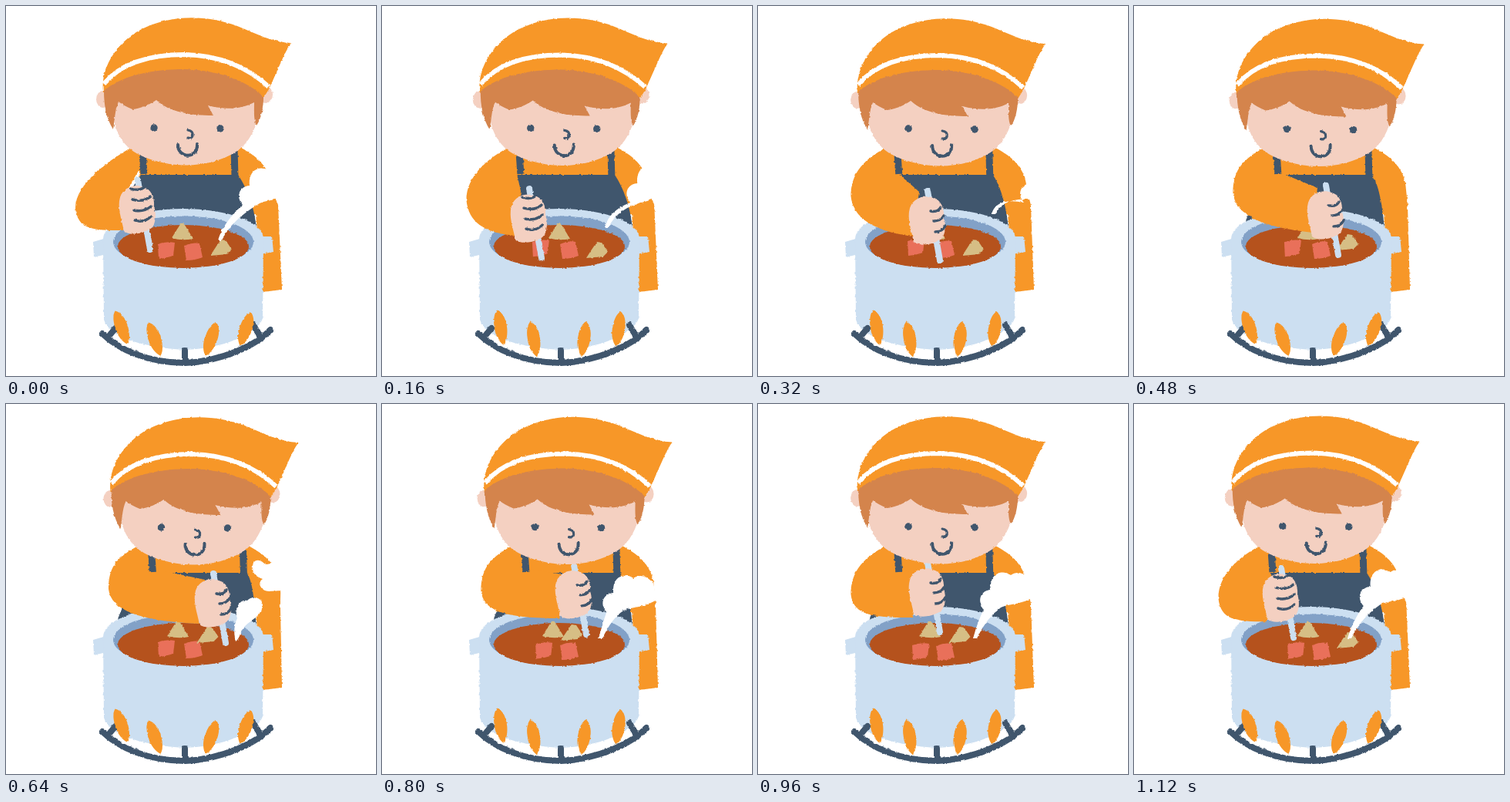
These frames come from a looping animation (480x480 px, 1.28 s). An HTML page:

```html
<!DOCTYPE html>
<html lang="en">
<head>
<meta charset="utf-8">
<title>Stirring the stew</title>
<style>
  html, body { margin: 0; width: 100%; height: 100%; overflow: hidden; background: #fff; }
  svg { display: block; width: 100%; height: 100%; }
  .orange { fill: #f79728; }
  .skin { fill: #f4d0c1; }
  .hair { fill: #d4844c; }
  .navy { fill: #40566d; }
  .pot { fill: #ccdff1; }
  .carrot { fill: #e9705a; }
  .potato { fill: #d6be85; }
  .white { fill: #fff; }
  .line { fill: none; stroke: #40566d; stroke-linecap: round; stroke-linejoin: round; }
</style>
</head>
<body>
<svg viewBox="0 0 480 480">
  <defs>
    <filter id="crayon" filterUnits="userSpaceOnUse" x="0" y="0" width="480" height="480" color-interpolation-filters="sRGB">
      <feTurbulence type="fractalNoise" baseFrequency="0.28" numOctaves="2" seed="4"/>
      <feDisplacementMap in="SourceGraphic" scale="2.8" xChannelSelector="R" yChannelSelector="G"/>
    </filter>
  </defs>
  <g filter="url(#crayon)">
    <path id="shirt" class="orange"/>
    <path id="apron" class="navy"/>

    <g class="pot">
      <path d="M113,306 L130,301 V322 L114,326Z M329,299 H345 L347,319 L329,322Z"/>
      <path d="M126,302 A104,39 0 0 1 334,302 L333,405 C327,426 278,445 232,446 C188,444 134,432 127,407Z"/>
    </g>
    <ellipse cx="230" cy="306" rx="91" ry="33.5" fill="#82a1c7"/>
    <ellipse cx="230" cy="312" rx="85" ry="28" fill="#b5521d"/>
    <g id="food">
      <path class="potato" d="M-14,8 L-2,-11 Q1,-12 3,-9 L14,9 Q0,12 -14,8Z"/>
      <path class="carrot" d="M-11,-8 Q0,-12 11,-10 L9,7 Q0,10 -10,11Z"/>
      <path class="carrot" d="M-12,-8 Q-2,-13 8,-11 L12,7 Q2,11 -9,11Z"/>
      <path class="potato" d="M-14,10 Q-6,-3 0,-11 L6,-10 L14,2 L8,8Z"/>
    </g>

    <path id="arm" class="orange"/>
    <path id="straps" class="line" stroke-width="9" style="stroke-linecap:butt"/>
    <g id="hand">
      <path d="M1,-38 L17,52" fill="none" stroke="#ccdff1" stroke-width="8" stroke-linecap="round"/>
      <path class="skin" d="M-22,-16 C-17,-30 -2,-33 8,-29 C18,-27 23,-16 22,-4 C26,8 24,24 14,27 C4,32 -10,34 -17,28 C-20,12 -26,-2 -22,-16Z"/>
      <path id="fingers" class="line" stroke-width="3.4"/>
    </g>

    <g id="head">
      <g class="skin">
        <ellipse cx="126" cy="121" rx="9" ry="11"/>
        <ellipse cx="337" cy="115" rx="9" ry="11"/>
        <path d="M138,120 C136,155 148,182 175,194 C215,212 265,211 300,188 C318,176 329,150 331,120Z"/>
      </g>
      <path class="orange" d="M126,112 C122,75 150,38 190,24 C225,11 265,13 300,26 C325,36 345,47 370,48 C361,60 352,85 341,108 L331,124Z"/>
      <path class="hair" d="M127,110 C150,90 190,82 232,82 C275,83 315,98 334,118 C334,132 331,146 325,155 C321,148 322,135 322,125 C305,134 285,135 262,129 L269,142 C240,142 212,138 195,122 C186,128 175,133 164,134 C156,131 150,127 146,124 C141,135 141,150 139,160 C130,146 127,128 127,110Z"/>
      <path d="M127,101 C150,73 190,63 232,63 C275,64 312,78 341,105" fill="none" stroke="#fff" stroke-width="6"/>
      <g class="navy"><circle cx="192" cy="158" r="4.7"/><circle cx="278" cy="159" r="4.7"/></g>
      <path class="line" stroke-width="3.2" d="M236,161 Q243,162 242,168 Q241,172 236,171"/>
      <path class="line" stroke-width="4" d="M223,180 C223,198 249,199 248,179"/>
    </g>

    <path id="steam" class="white"/>
    <path class="line" stroke-width="8" d="M125,425 C146,446 185,463 232,463 C280,461 325,440 343,420 M142,418 L132,430 M232,447 V462 M321,414 L331,431"/>
    <g id="flames"></g>
  </g>
</svg>
<script>
const STEP = 160, STEPS = 8;
const { sin, cos, sqrt, max, PI } = Math;
const $ = id => document.getElementById(id);
const draw = (id, d) => $(id).setAttribute('d', d);
const place = (el, x, y, turn = 0) =>
  el.setAttribute('transform', `translate(${x} ${y}) rotate(${turn})`);

const longFingers = 'M-8,-27 Q4,-23 12,-31 M-6,-13 Q8,-9 17,-17 M-4,1 Q8,4 18,-4 M-3,14 Q9,18 18,9';
const shortFingers = 'M5,-12 Q14,-10 18,-17 M9,1 Q18,1 22,-6 M11,15 Q20,15 24,7';
const youngSteam = 'M320,215 C318,204 326,199 334,206 C340,212 345,202 362,206 V242 C345,242 338,245 333,240 C328,236 328,230 333,227 C324,224 321,220 320,215Z ' +
  'M298,308 C295,298 296,285 300,278 C296,265 303,253 313,255 C320,247 334,252 333,262 C331,277 314,281 307,292 C303,299 303,304 298,308Z';

const flames = [[152, 417], [195, 432], [264, 432], [309, 419]].map(([x, y]) => {
  const leaf = document.createElementNS('http://www.w3.org/2000/svg', 'path');
  leaf.setAttribute('class', 'orange');
  leaf.setAttribute('d', 'M-1,-23 C6,-19 9,-8 8,3 C7,13 4,20 0,23 C-5,18 -9,9 -8,-3 C-8,-12 -5,-20 -1,-23Z');
  return { leaf: $('flames').appendChild(leaf), x, y, side: x < 230 ? -1 : 1 };
});

function drawBody(dx) {
  const lean = dx * 1.2;
  draw('shirt', `M${170 + dx},180 L${305 + dx},184 C${328 + dx},196 ${344 + lean},212 ${345 + lean},238
    L${353 + dx * 0.3},258 L358,368 L333,371 L324,270 L180,300Z`);
  draw('apron', `M${175 + lean},219 H${301 + lean} C${309 + lean},231 322,255 325,290 V310 H141 C141,280 150,255 ${175 + lean},219Z`);
  draw('straps', `M${177 + lean},188 L${179 + lean},218 M${296 + lean},184 L${297 + lean},222`);
}

function drawArm(dx, reach, hx, hy, swing) {
  const ex = 90 + 43 * sqrt(reach), ey = 262 - 22 * sqrt(reach);
  const lx = hx - 18, ly = hy + 27 - 6 * swing;
  const bend = ly - max(0, ly - ey - 38) / 2;
  draw('arm', `M${162 + dx},184 C${137 + dx},198 ${ex},${ey - 32} ${ex},${ey}
    C${ex + 3},${ey + 28} ${ex + 0.35 * (lx - ex)},${bend} ${lx},${ly}
    L${hx - 10},${hy - 30 - 7 * swing} L${173 + dx},212 V186Z`);
  place($('hand'), hx, hy);
  draw('fingers', reach < 0.3 ? longFingers : shortFingers);
}

function drawFood(angle, swing) {
  const drift = cos(angle - PI / 4);
  const push = ((1 - drift) / 2) ** 4;
  [
    [226 + 4 * drift, 293],
    [208 - 3 * swing, 317 - 4 * swing],
    [243, 319 - 3 * swing],
    [279 - 33 * push, 307 + 10 * drift]
  ].forEach((spot, i) => place($('food').children[i], ...spot));
}

function drawFlames(step) {
  const sway = 7 * cos(PI / 2 * (step + 0.5));
  for (const { leaf, x, y, side } of flames) {
    place(leaf, x + side * sway * 0.4, y, side * (14 + sway));
  }
}

// the trail forms, grows, then lifts off the soup and drifts away
function steamPath(age) {
  if (age === 0) return youngSteam;
  if (age > 6) return '';
  const lift = max(0, age - 4);
  const x = 283 - 2 * age + 16 * lift, y = 304 - 17 * lift;
  const dx = age ** 3 / 4 - 2, dy = max(-7, 12 - 4 * age);
  const p = (a, b) => `${a + dx},${b + dy}`;
  return `M${x},${y} Q${x + 6},${y - 22} ${p(293, 262)} C${p(284, 252)} ${p(288, 238)} ${p(302, 237)}
    C${p(300, 216)} ${p(316, 210)} ${p(328, 218)} C${p(335, 213)} ${p(345, 214)} ${p(354, 225)}
    L${p(358, 246)} C${p(340, 257)} ${p(325, 255)} ${p(315, 260)} Q${x + 17},${y - 26} ${x + 5},${y}Z`;
}

function show(step) {
  const angle = 2 * PI * step / STEPS;
  const swing = sin(angle);
  const hx = 219 - 45 * cos(angle) - 4 * cos(3 * angle);
  const hy = 261 + 17 * swing + 3 * cos(angle);
  const reach = max(0, (hx - 170) / 98);
  const dx = 9.5 * reach ** 1.6;
  drawBody(dx);
  drawArm(dx, reach, hx, hy, swing);
  place($('head'), dx, 2 * reach);
  drawFood(angle, swing);
  drawFlames(step);
  draw('steam', steamPath((step + 4) % STEPS));
}

let shown = -1;
function tick() {
  const step = Math.floor(performance.now() / STEP) % STEPS;
  if (step !== shown) show(shown = step);
  requestAnimationFrame(tick);
}
tick();
</script>
</body>
</html>
```
